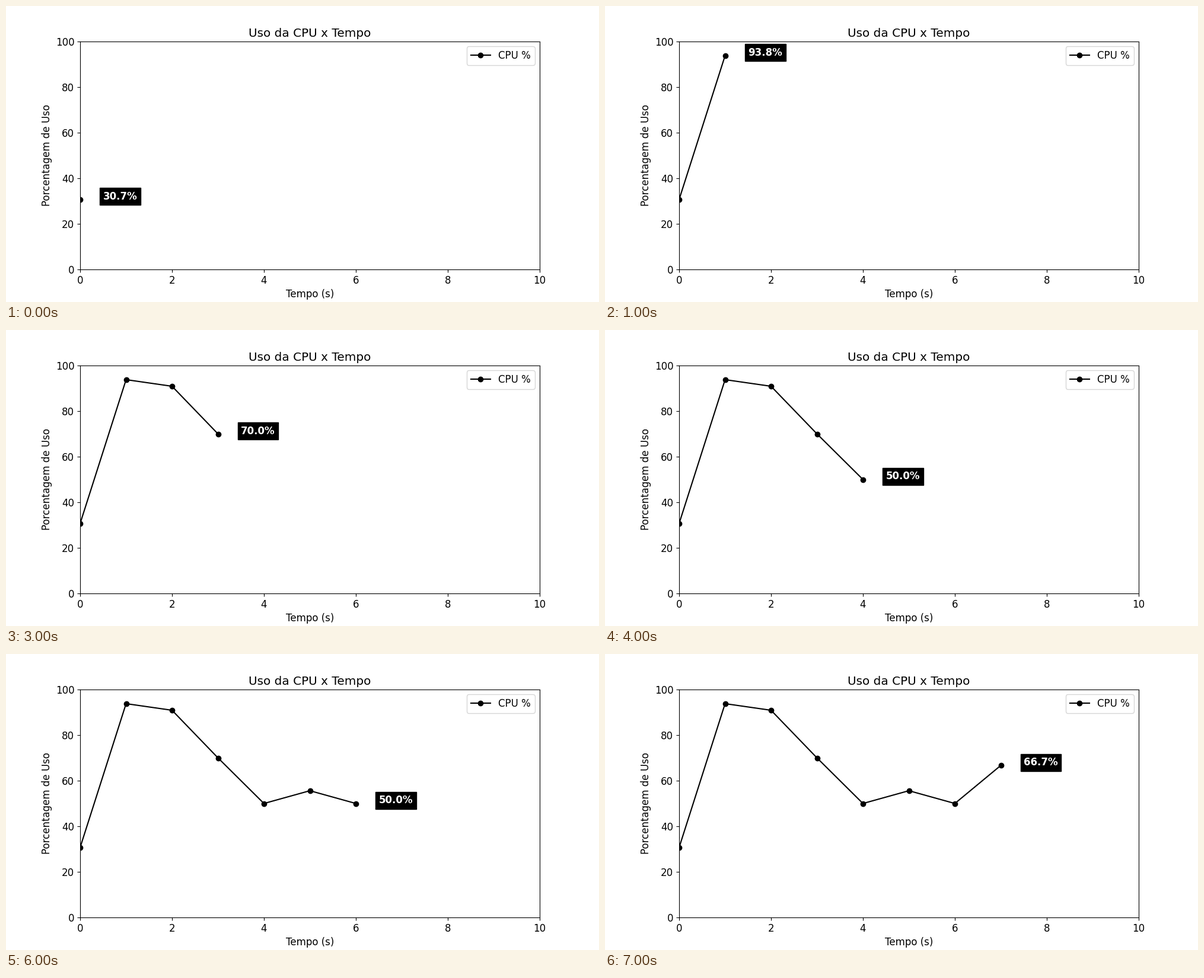
Recreate the animation shown at these times as a matplotlib script. Size 1000 by 500 pixels, loop 8000 ms.

```python
import matplotlib.pyplot as plt
from matplotlib.animation import FuncAnimation

plt.rcParams.update({"font.family": "DejaVu Sans", "font.size": 12})

CPU_USAGE = [30.7, 93.8, 90.9, 70.0, 50.0, 55.6, 50.0, 66.7]
LABEL_OFFSET = 0.5

fig, ax = plt.subplots(figsize=(10, 5), dpi=100)
ax.set(
    xlim=(0, 10),
    ylim=(0, 100),
    title="Uso da CPU x Tempo",
    xlabel="Tempo (s)",
    ylabel="Porcentagem de Uso",
)
line, = ax.plot([], [], color="black", marker="o", label="CPU %")
ax.legend(loc="upper right")
label = ax.text(0, 0, "", color="white", weight="bold",
                bbox=dict(facecolor="black"))


def update(second):
    values = CPU_USAGE[:second + 1]
    line.set_data(range(len(values)), values)
    label.set_position((second + LABEL_OFFSET, values[-1]))
    label.set_text(f"{values[-1]:.1f}%")
    return line, label


anim = FuncAnimation(fig, update, frames=len(CPU_USAGE), interval=1000,
                     repeat=True, repeat_delay=0)
plt.show()
```
